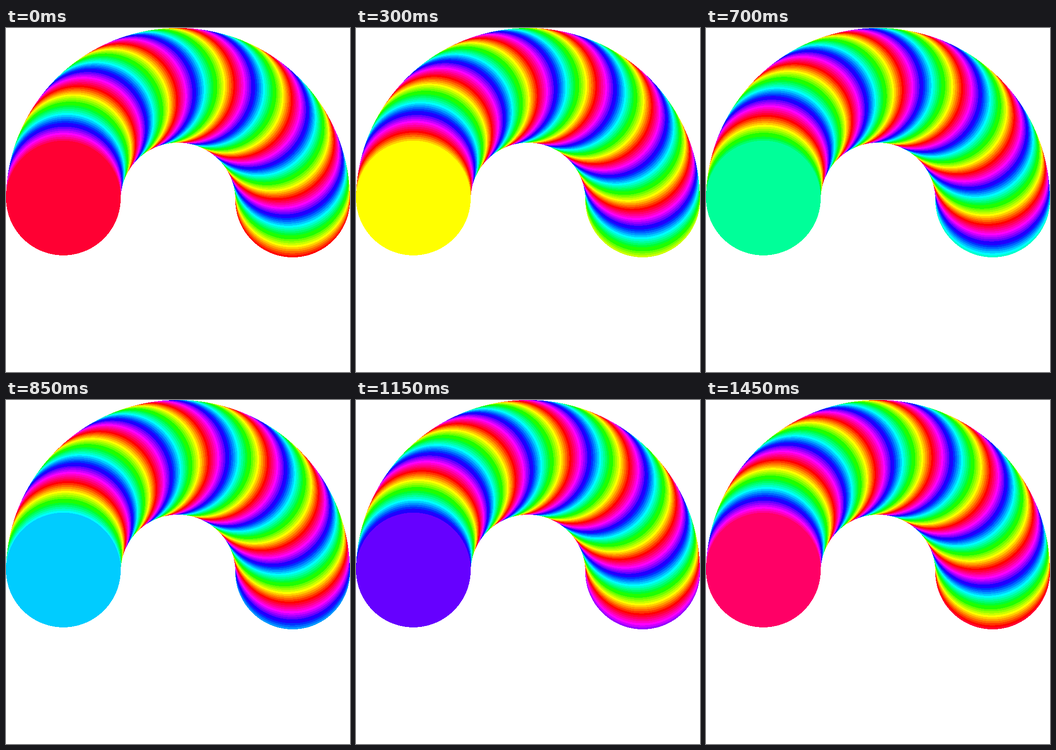
An HTML page with a canvas that plays this animation: 720 px wide and 720 px high, repeating every 1.5 s.

```html
<!DOCTYPE html>
<html lang="en">
<head>
<meta charset="utf-8">
<title>Rainbow arch</title>
<style>
  html, body { margin: 0; width: 100%; height: 100%; overflow: hidden; background: #fff; }
  canvas { display: block; width: 720px; height: 720px; }
</style>
</head>
<body>
<canvas id="stage" width="720" height="720"></canvas>
<script>
const SIZE = 720, MID = 360, ARC = 240, R = 120;
const DISCS = 180, HUES = 30, STEP_MS = 50;

const ctx = document.getElementById('stage').getContext('2d');
const image = ctx.createImageData(SIZE, SIZE);
const pixels = new Uint32Array(image.data.buffer);
const pack = (r, g, b) => (255 << 24 | b << 16 | g << 8 | r) >>> 0;

// Fully saturated hue wheel
function hueColor(deg) {
  const channel = n => {
    const k = (n + deg / 60) % 6;
    return Math.round(255 * (1 - Math.max(0, Math.min(k, 4 - k, 1))));
  };
  return pack(channel(5), channel(3), channel(1));
}

const palette = Array.from({ length: HUES }, (_, i) => hueColor(i * 360 / HUES));
// Pure green and pure blue share one tone with a neighbouring hue
palette[9] = palette[10] = pack(31, 255, 0);
palette[20] = palette[21] = pack(31, 0, 255);

// Topmost disc at each pixel, with hard edges; 255 means background
const discAt = new Uint8Array(SIZE * SIZE).fill(255);
for (let i = 0; i < DISCS; i++) {
  const a = i * Math.PI / DISCS;
  const cx = MID + ARC * Math.cos(a), cy = MID - ARC * Math.sin(a);
  const bottom = Math.min(SIZE, Math.ceil(cy + R));
  for (let y = Math.max(0, Math.floor(cy - R)); y < bottom; y++) {
    const dy = y + 0.5 - cy;
    if (Math.abs(dy) >= R) continue;
    const half = Math.sqrt(R * R - dy * dy);
    const left = Math.max(0, Math.ceil(cx - half - 0.5));
    const right = Math.min(SIZE, Math.ceil(cx + half - 0.5));
    discAt.fill(i, y * SIZE + left, y * SIZE + Math.max(left, right));
  }
}

const white = pack(255, 255, 255);
let shown = -1;

function draw(time) {
  const step = Math.floor(time / STEP_MS) % HUES;
  if (step === shown) return;
  shown = step;
  for (let p = 0; p < pixels.length; p++) {
    const disc = discAt[p];
    pixels[p] = disc === 255 ? white : palette[(disc + step) % HUES];
  }
  ctx.putImageData(image, 0, 0);
}

const start = performance.now();
function tick() {
  draw(performance.now() - start);
  requestAnimationFrame(tick);
}
tick();
</script>
</body>
</html>
```
